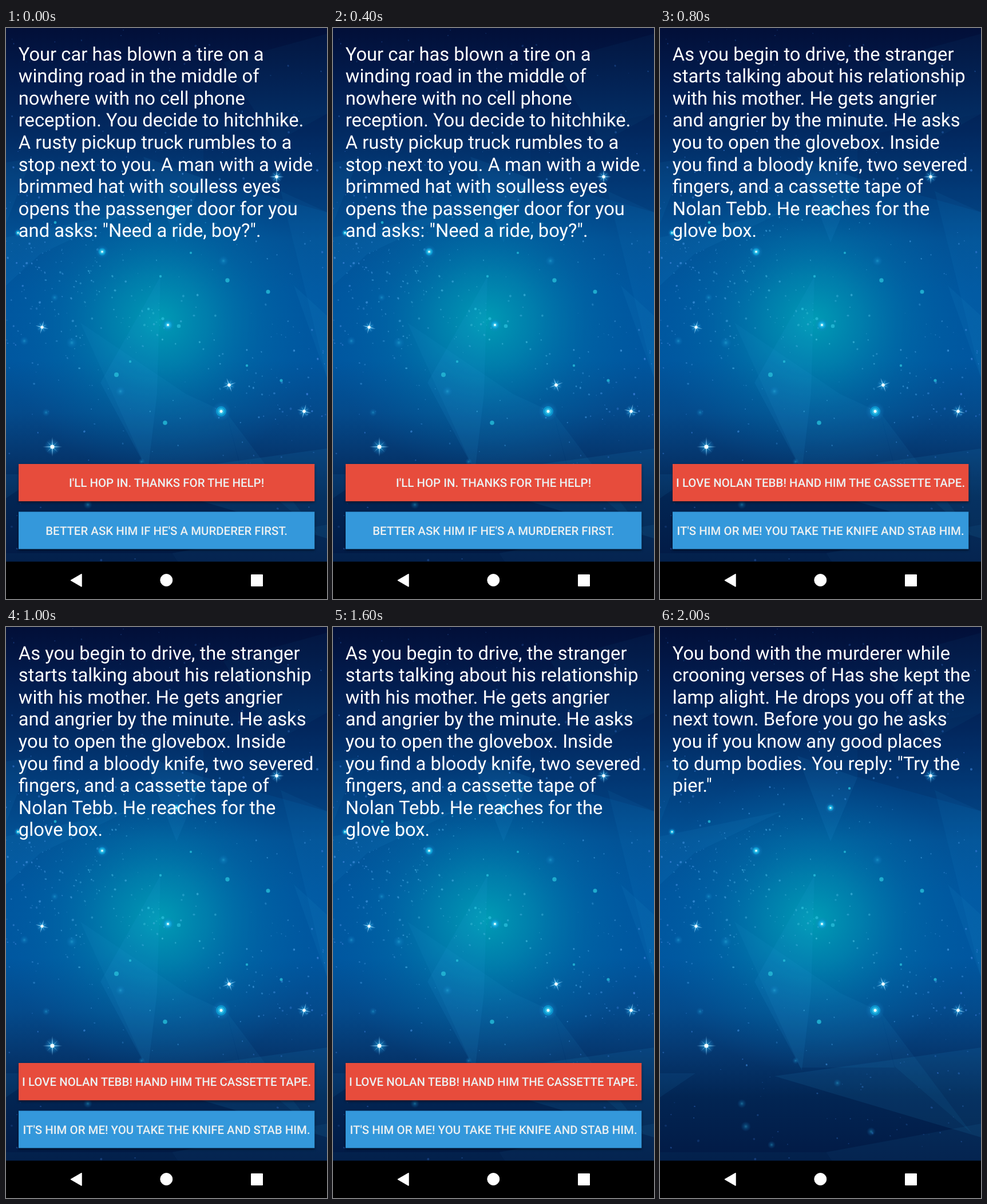
Write an HTML page that moves like this. It is 561 by 998 pixels and loops after 8 s.

```html
<!DOCTYPE html>
<html lang="en">
<head>
<meta charset="utf-8">
<title>Hitchhiker story</title>
<style>
  html, body { margin: 0; width: 100%; height: 100%; overflow: hidden; background: #000; }
  svg { display: block; width: 100%; height: 100%; }
  text { font-family: Roboto, "Open Sans", sans-serif; text-rendering: geometricPrecision; }
  .story { font-size: 32.72px; fill: #fff; }
  .label { font-size: 20.45px; font-weight: 500; fill: #ecf0f1; text-anchor: middle; }
</style>
</head>
<body>
<svg id="stage" viewBox="0 0 561 998" preserveAspectRatio="none">
  <defs>
    <linearGradient id="night" x1="0" y1="0" x2="0" y2="1">
      <stop offset="0" stop-color="#020f38"/>
      <stop offset=".1" stop-color="#021c4e"/>
      <stop offset=".2" stop-color="#022b63"/>
      <stop offset=".3" stop-color="#023f7e"/>
      <stop offset=".4" stop-color="#025296"/>
      <stop offset=".5" stop-color="#00569f"/>
      <stop offset=".62" stop-color="#0057a0"/>
      <stop offset=".72" stop-color="#044a8b"/>
      <stop offset=".8" stop-color="#05376f"/>
      <stop offset=".88" stop-color="#022553"/>
      <stop offset="1" stop-color="#021a45"/>
    </linearGradient>
    <radialGradient id="core">
      <stop offset="0" stop-color="#00a0b6" stop-opacity=".95"/>
      <stop offset=".3" stop-color="#008ab0" stop-opacity=".75"/>
      <stop offset=".62" stop-color="#0073aa" stop-opacity=".38"/>
      <stop offset="1" stop-color="#0060a4" stop-opacity="0"/>
    </radialGradient>
    <radialGradient id="halo">
      <stop offset="0" stop-color="#3cc8f0" stop-opacity=".9"/>
      <stop offset=".35" stop-color="#1ea0dc" stop-opacity=".5"/>
      <stop offset="1" stop-color="#1478c8" stop-opacity="0"/>
    </radialGradient>
    <filter id="soft" x="-5%" y="-20%" width="110%" height="150%">
      <feGaussianBlur stdDeviation="2"/>
    </filter>
  </defs>
  <rect width="561" height="933" fill="url(#night)"/>
  <ellipse cx="268" cy="512" rx="285" ry="270" fill="url(#core)"/>
  <g id="sky"></g>
  <g id="buttons"></g>
  <g id="story"></g>
  <rect y="932.7" width="561" height="65.3" fill="#000"/>
  <g fill="#fff" stroke="#fff" stroke-linejoin="round">
    <path d="M113.5 965.3L132 954.7V976Z" stroke-width="1.5"/>
    <circle cx="280.3" cy="965" r="10.5" stroke-width="1"/>
    <rect x="429" y="956" width="19" height="19" stroke-width="2"/>
  </g>
</svg>
<script>
const NS = "http://www.w3.org/2000/svg";
const LOOP = 8000;
const byId = id => document.getElementById(id);

function add(parent, tag, attrs, text) {
  const el = document.createElementNS(NS, tag);
  for (const key in attrs) el.setAttribute(key, attrs[key]);
  if (text) el.textContent = text;
  parent.appendChild(el);
  return el;
}

let seed = 71;
function rand() {
  seed = (seed * 16807) % 2147483647;
  return seed / 2147483647;
}
const spread = () => rand() + rand() + rand() - 1.5;

const scenes = [
  { start: 0,
    lines: ["Your car has blown a tire on a", "winding road in the middle of",
      "nowhere with no cell phone", "reception. You decide to hitchhike.",
      "A rusty pickup truck rumbles to a", "stop next to you. A man with a wide",
      "brimmed hat with soulless eyes", "opens the passenger door for you",
      "and asks: \"Need a ride, boy?\"."],
    choices: ["I'LL HOP IN. THANKS FOR THE HELP!", "BETTER ASK HIM IF HE'S A MURDERER FIRST."] },
  { start: 800,
    lines: ["As you begin to drive, the stranger", "starts talking about his relationship",
      "with his mother. He gets angrier", "and angrier by the minute. He asks",
      "you to open the glovebox. Inside", "you find a bloody knife, two severed",
      "fingers, and a cassette tape of", "Nolan Tebb. He reaches for the",
      "glove box."],
    choices: ["I LOVE NOLAN TEBB! HAND HIM THE CASSETTE TAPE.", "IT'S HIM OR ME! YOU TAKE THE KNIFE AND STAB HIM."] },
  { start: 2000,
    lines: ["You bond with the murderer while", "crooning verses of Has she kept the",
      "lamp alight. He drops you off at the", "next town. Before you go he asks",
      "you if you know any good places", "to dump bodies. You reply: \"Try the",
      "pier.\""],
    choices: [] }
];

const sky = byId("sky");

// Translucent facets: outline, colour, opacity
const LIGHT = "#2ba6e0", DARK = "#001a4c";
[
  ["240,225 345,263 298,375", LIGHT, .09],
  ["0,366 213,322 60,395 0,450", LIGHT, .08],
  ["0,235 45,228 0,342", LIGHT, .06],
  ["345,190 561,150 561,322 345,262", DARK, .16],
  ["480,285 561,322 561,612", LIGHT, .06],
  ["503,450 561,503 561,612", LIGHT, .07],
  ["270,434 264,640 248,775 165,620", LIGHT, .09],
  ["130,515 315,640 385,672 410,770 245,770", LIGHT, .07],
  ["385,672 545,885 410,768", LIGHT, .07],
  ["200,785 561,735 561,892", LIGHT, .1],
  ["0,780 62,780 0,822", LIGHT, .08],
  ["290,918 561,868 561,933 300,933", LIGHT, .07],
  ["0,918 290,918 300,933 0,933", LIGHT, .04],
  ["380,60 561,10 561,150 470,200", LIGHT, .04]
].forEach(([points, fill, opacity]) => add(sky, "polygon", { points, fill, opacity }));

// Fine dust: even over the sky, thicker at the left and lower right
function speck(x, y) {
  const near = Math.max(0, 1 - Math.hypot(x - 270, y - 500) / 330);
  const r = .7 + 1.5 * rand() ** 1.6;
  const hue = 213 - 26 * near + 6 * rand();
  const fade = y < 200 || y > 780 ? .4 : .75;
  add(sky, "ellipse", {
    cx: x.toFixed(1), cy: y.toFixed(1), rx: r.toFixed(1), ry: (r * (.6 + .5 * rand())).toFixed(1),
    fill: `hsl(${hue.toFixed()},68%,55%)`, opacity: (fade * (.45 + .55 * rand())).toFixed(2),
    transform: `rotate(${(rand() * 90).toFixed()} ${x.toFixed(1)} ${y.toFixed(1)})`
  });
}
for (let i = 0; i < 270; i++) speck(rand() * 561, rand() * 930);
for (let i = 0; i < 130; i++) speck(Math.abs(100 + spread() * 130), 430 + spread() * 160);
for (let i = 0; i < 45; i++) speck(470 + spread() * 110, 630 + spread() * 120);
for (let i = 0; i < 28; i++) speck(262 + spread() * 65, 510 + spread() * 65);

function glow(x, y, r, opacity) {
  add(sky, "circle", { cx: x, cy: y, r, fill: "url(#halo)", opacity });
}

// Blurred spots
[[380, 407, 9], [200, 635, 9], [115, 550, 10], [32, 547, 8], [150, 873, 9], [143, 833, 8],
 [195, 905, 7], [310, 797, 7], [237, 758, 6], [70, 672, 7], [85, 471, 7], [369, 882, 8]]
  .forEach(([x, y, r]) => glow(x, y, r, .5));

// Solid dots
[[193, 606, 4], [387, 441, 3.7], [458, 461, 3.5], [278, 690, 3.8], [302, 521, 3.3], [274, 508, 2.6],
 [249, 491, 2.2], [481, 616, 2.6], [421, 590, 2.2], [323, 393, 2], [331, 282, 2.2], [217, 583, 2.2],
 [270, 434, 2.2], [86, 340, 2.4]]
  .forEach(([cx, cy, r]) => add(sky, "circle", { cx, cy, r, fill: "#25b9d6", opacity: .85 }));

// Ringed stars
[[298, 316, 7], [21, 358, 5.5], [168, 391, 8.5], [283, 519, 9], [376, 670, 12]].forEach(([x, y, r]) => {
  glow(x, y, r * 1.4, .8);
  add(sky, "circle", { cx: x, cy: y, r: r * .75, fill: "#0aa4dc", opacity: .7 });
  add(sky, "circle", { cx: x, cy: y, r: r * .48, fill: "#38c4e8", opacity: .75 });
  add(sky, "circle", { cx: x, cy: y, r: r * .22, fill: "#e8ffff" });
});

// Sparkles with four long and four short rays
[[473, 260, 13, 0], [63, 523, 12, 15], [390, 624, 13, -20], [521, 670, 13, 15], [81, 732, 17, 0]]
  .forEach(([x, y, r, tilt]) => {
    glow(x, y, r * .85, 1);
    const star = add(sky, "g", { transform: `translate(${x} ${y}) rotate(${tilt})`, fill: "#9fdcff" });
    const ray = `M0 ${-r}L1 -1L${r} 0L1 1L0 ${r}L-1 1L${-r} 0L-1 -1Z`;
    add(star, "path", { d: ray, opacity: .8 });
    add(star, "path", { d: ray, transform: "rotate(45) scale(.8)", opacity: .4 });
    add(star, "circle", { r: r * .21, fill: "#f4ffff" });
  });

// Choice buttons
const buttons = byId("buttons");
const labels = [[762, "#e74c3c"], [845.5, "#3498db"]].map(([y, fill]) => {
  const box = { x: 22, width: 517.3, height: 65.2 };
  add(buttons, "rect", { ...box, y: y + 2, fill: "#000", opacity: .5, filter: "url(#soft)" });
  add(buttons, "rect", { ...box, y, fill });
  return add(buttons, "text", { class: "label", x: 280.6, y: y + 40.4 });
});

// One text group per scene
const pages = scenes.map(scene => {
  const page = add(byId("story"), "g", {});
  scene.lines.forEach((line, i) =>
    add(page, "text", { class: "story", x: 21.8, y: 56.5 + i * 38.62 }, line));
  return page;
});

let shown = -1;
function render(time) {
  const now = time % LOOP;
  const index = scenes.filter(scene => scene.start <= now).length - 1;
  if (index === shown) return;
  shown = index;
  pages.forEach((page, i) => page.style.display = i === index ? "" : "none");
  const { choices } = scenes[index];
  buttons.style.display = choices.length ? "" : "none";
  labels.forEach((label, i) => label.textContent = choices[i] || "");
}

const begin = performance.now();
function tick() {
  render(performance.now() - begin);
  requestAnimationFrame(tick);
}
tick();
</script>
</body>
</html>
```
